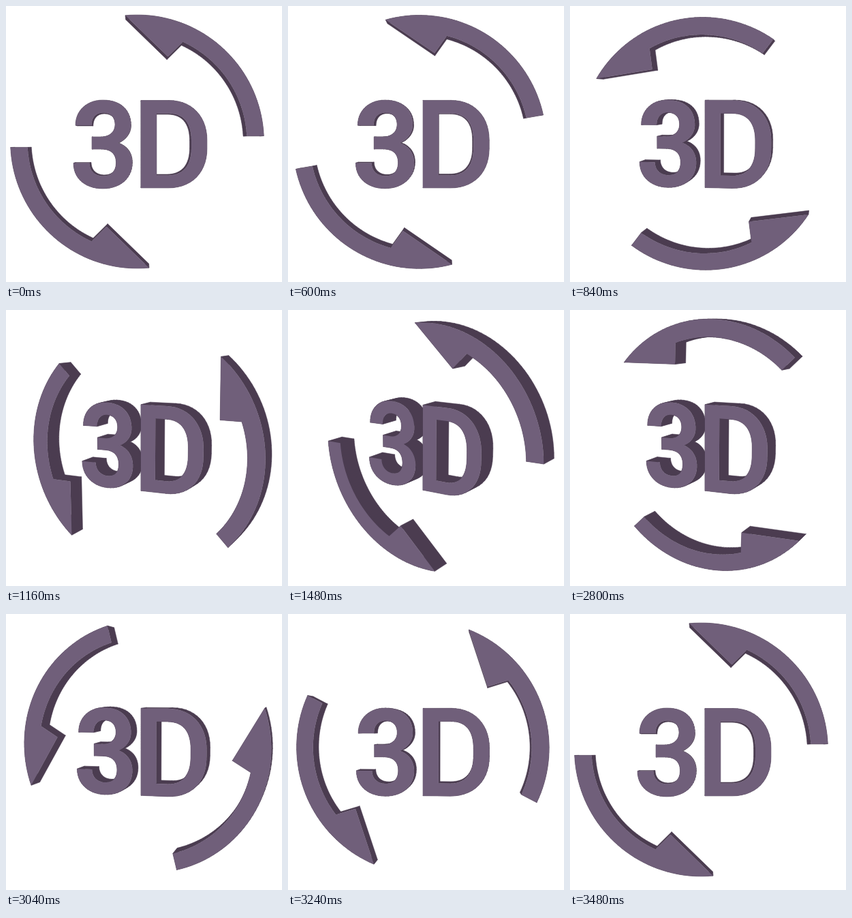
Recreate the animation shown at these times as an HTML page. Size 405x405 px, loop 4040 ms.

```html
<!DOCTYPE html>
<html lang="en">
<head>
<meta charset="utf-8">
<title>3D turn</title>
<style>
  html, body { margin: 0; width: 100%; height: 100%; overflow: hidden; background: #fff; }
  svg { display: block; width: 100vw; height: 100vh; }
  .side { fill: #4b3c50; stroke: #4b3c50; stroke-width: .5; stroke-linejoin: round; }
  .face { fill: #705f7a; fill-rule: evenodd; }
</style>
</head>
<body>
<svg id="stage" viewBox="0 0 405 405" role="img" aria-label="3D"></svg>
<script>
const LOOP = 4040, STEP = 40, TURN = 1000, STARTS = [480, 2480];
const CX = 197.3, CY = 203, EYE = 1000, DEPTH = 35;
const YAW = 33, PITCH = 14;
// The ring of arrows sits slightly off the pivot, so it wobbles as it spins.
const RING_X = -4.8, RING_Y = -4;
const rad = deg => deg * Math.PI / 180;

// Flattens an M/L/C path in stage units to loops of points around the pivot.
function flatten(path) {
  const loops = [];
  let loop, x = 0, y = 0;
  const add = (px, py) => loop.push([px - CX, py - CY]);
  for (const part of path.match(/[MLC][^MLC]*/g)) {
    const n = part.slice(1).trim().split(/[\s,]+/).map(Number);
    if (part[0] === 'M') loops.push(loop = []);
    if (part[0] === 'C') {
      for (let i = 1; i <= 14; i++) {
        const s = i / 14, r = 1 - s;
        const mix = (a, k) => r * r * r * a + 3 * r * r * s * n[k] + 3 * r * s * s * n[k + 2] + s * s * s * n[k + 4];
        add(mix(x, 0), mix(y, 1));
      }
    } else {
      add(n[0], n[1]);
    }
    [x, y] = n.slice(-2);
  }
  return loops;
}

function arc(r, from, to) {
  return Array.from({ length: 41 }, (_, i) => {
    const a = from + (to - from) * i / 40;
    return [r * Math.cos(a), r * Math.sin(a)];
  });
}

const three = flatten(
  'M126 192 L139.5 192 C152 192 160 184.5 160 174 C160 163 153.5 156.5 142.5 156.5' +
  'C132.5 156.5 125.5 163 125.5 175 L102 175 C102 153 119 138 142 138' +
  'C167.5 138 183 151.5 183 174.5 C183 186 175.5 196 164 201' +
  'C177.5 205.5 185 216 185 230.5 C185 253.5 167 268 142 268' +
  'C118 268 99 254.5 99 230.5 L122.5 230.5 C122.5 242 130.5 249.5 142.5 249.5' +
  'C154.5 249.5 161.5 242.5 161.5 230 C161.5 217 154 210 140 210 L126 210');

const dee = flatten(
  'M198 138.5 L239 138.5 C273 138.5 295 162 295 197 L295 209 C295 244 273 267 238 267 L198 267' +
  'M221 157.5 L239 157.5 C261 157.5 272 172 272 197 L272 209 C272 234 260 248.5 238 248.5 L221 248.5');

const arrow = [
  ...arc(186, Math.atan2(-8.5, 185.5), Math.atan2(-186, -17.5)),
  [45, -124.7],
  ...arc(161, Math.atan2(-146.4, 67), Math.atan2(-8.5, 160.8))
];
const place = sign => [arrow.map(([x, y]) => [sign * x + RING_X, sign * y + RING_Y])];

const svg = document.getElementById('stage');
function makePath(cls) {
  const el = document.createElementNS('http://www.w3.org/2000/svg', 'path');
  el.setAttribute('class', cls);
  return svg.appendChild(el);
}
const solid = (loops, spins) => ({ loops, spins, side: makePath('side'), face: makePath('face') });
const solids = [
  solid(place(1), true),
  solid(place(-1), true),
  solid(three, false),
  solid(dee, false)
];

const trace = pts => 'M' + pts.map(p => p[0].toFixed(2) + ' ' + p[1].toFixed(2)).join('L') + 'Z';

// A wall between front and back, always wound the same way so walls never cancel.
function wall(a, b, c, d) {
  const area = (c[0] - a[0]) * (d[1] - b[1]) - (d[0] - b[0]) * (c[1] - a[1]);
  return trace(area > 0 ? [a, b, c, d] : [d, c, b, a]);
}

function drawSolid(item, tilt, turn) {
  const spin = item.spins ? -rad(turn) : 0;
  const yaw = rad(YAW * tilt), pitch = rad(PITCH * tilt);
  const cs = Math.cos(spin), ss = Math.sin(spin);
  const cy = Math.cos(yaw), sy = Math.sin(yaw), cp = Math.cos(pitch), sp = Math.sin(pitch);

  function project([px, py], z) {
    const x = px * cs - py * ss, y = px * ss + py * cs;
    const x1 = x * cy - z * sy, z1 = x * sy + z * cy;
    const y2 = y * cp + z1 * sp, z2 = z1 * cp - y * sp;
    const k = EYE / (EYE - z2);
    return [CX + x1 * k, CY + y2 * k];
  }

  let sides = '', faces = '';
  for (const loop of item.loops) {
    const front = loop.map(p => project(p, 0));
    const back = loop.map(p => project(p, -DEPTH));
    faces += trace(front);
    front.forEach((p, i) => {
      const j = (i + 1) % front.length;
      sides += wall(p, front[j], back[j], back[i]);
    });
  }
  item.side.setAttribute('d', sides);
  item.face.setAttribute('d', faces);
}

// Cubic Bézier easing (.4, .1, .69, 1), solved by bisection.
function ease(p) {
  const curve = (a, b, s) => 3 * a * s * (1 - s) ** 2 + 3 * b * s * s * (1 - s) + s ** 3;
  if (p <= 0 || p >= 1) return p <= 0 ? 0 : 1;
  let lo = 0, hi = 1;
  for (let i = 0; i < 24; i++) {
    const mid = (lo + hi) / 2;
    if (curve(0.4, 0.69, mid) < p) lo = mid; else hi = mid;
  }
  return curve(0.1, 1, lo);
}

function render(ms) {
  const t = Math.floor((ms % LOOP) / STEP) * STEP;
  const [out, home] = STARTS.map(s => ease((t - s) / TURN));
  for (const item of solids) drawSolid(item, out - home, 180 * (out + home));
}

const start = performance.now();
function tick() {
  render(performance.now() - start);
  requestAnimationFrame(tick);
}
tick();
</script>
</body>
</html>
```
